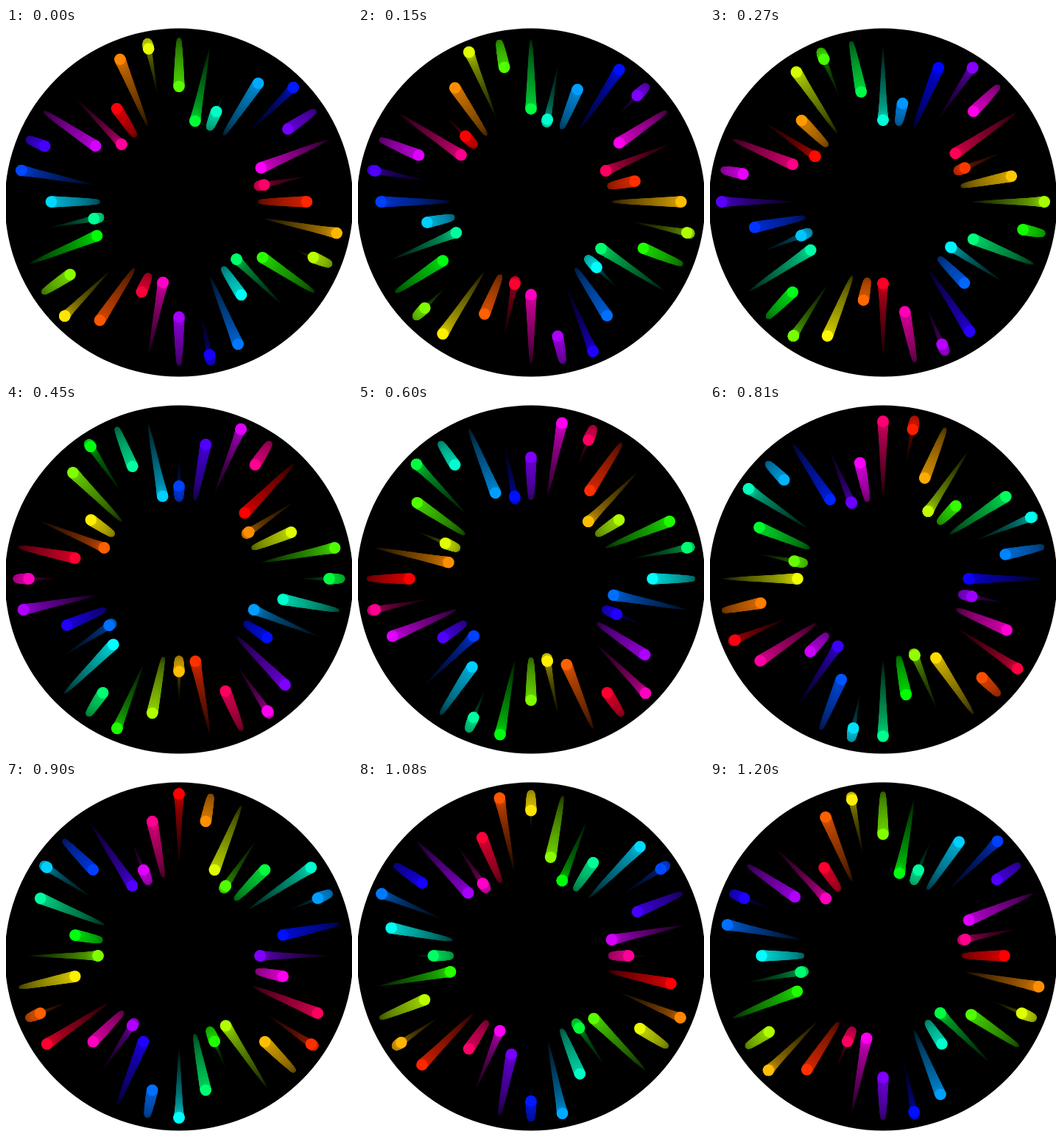
These frames come from a looping animation (470 by 474 pixels, 1.23 s). An HTML page with a canvas:

```html
<!DOCTYPE html>
<html lang="en">
<head>
<meta charset="utf-8">
<title>Pulsing comet ring</title>
<style>
  html, body { margin: 0; width: 100%; height: 100%; overflow: hidden; background: #fff; }
  canvas { display: block; }
</style>
</head>
<body>
<canvas id="stage" width="470" height="474"></canvas>
<script>
  const ctx = document.getElementById('stage').getContext('2d');
  const TAU = Math.PI * 2;
  const TICK = 30, TICKS = 41, STEP = 9;   // ms, ticks per loop, degrees per tick
  const COUNT = 32, WAVES = 6, HUE_TURNS = 3;
  const CX = 235, CY = 236, MID = 165, AMP = 55;
  const HEAD = 7.75, TAIL_SPAN = 144, TAIL_PARTS = 96;

  function disc(x, y, r, color) {
    ctx.fillStyle = color;
    ctx.beginPath();
    ctx.arc(x, y, r, 0, TAU);
    ctx.fill();
  }

  function comet(i, phase) {
    const angle = i / COUNT * TAU;
    const hue = (phase + i * HUE_TURNS * 360 / COUNT) % 360;
    const wave = phase + i * WAVES * 360 / COUNT;

    const dot = (lag, size, light) => {
      const r = MID + AMP * Math.sin((wave - lag) * TAU / 360);
      disc(CX + r * Math.cos(angle), CY + r * Math.sin(angle), size, `hsl(${hue}, 100%, ${light}%)`);
    };

    // Oldest part first, so the brighter ones lie on top
    for (let n = TAIL_PARTS - 1; n > 0; n--) {
      const age = n / TAIL_PARTS;
      dot(age * TAIL_SPAN, HEAD * (1 - age), 40 * (1 - age));
    }
    dot(0, HEAD, 50);
  }

  function draw(now) {
    const tick = Math.floor(now / TICK) % TICKS;
    const phase = Math.max(tick, 1) * STEP;   // the first pose holds for two ticks
    ctx.clearRect(0, 0, 470, 474);
    disc(235, 237, 236.5, '#000');
    for (let i = 0; i < COUNT; i++) comet(i, phase);
  }

  const start = performance.now();
  function loop() {
    draw(performance.now() - start);
    requestAnimationFrame(loop);
  }
  loop();
</script>
</body>
</html>
```
